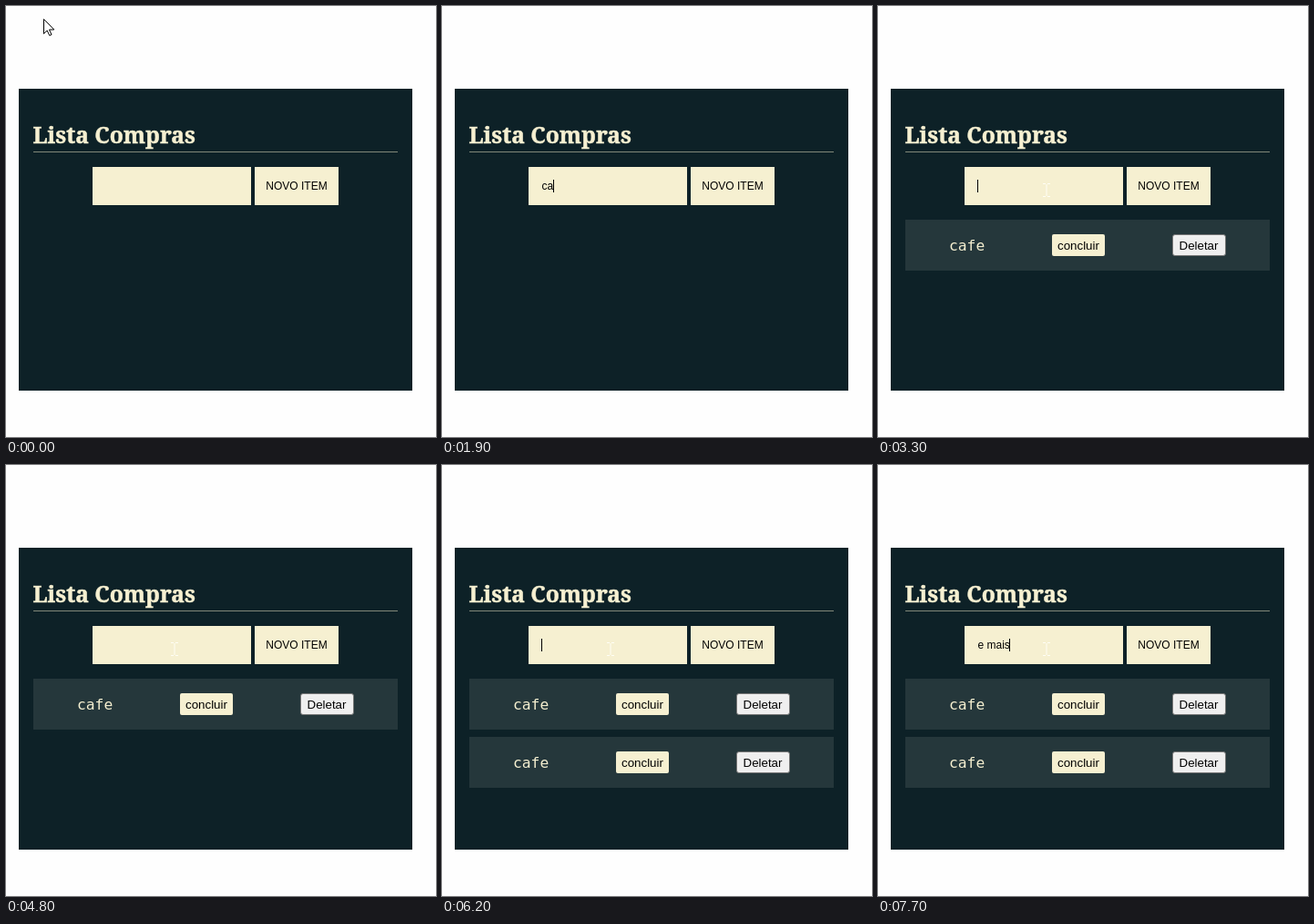
Recreate the animation shown at these times as an HTML page. Size 472x474 px, loop 8000 ms.

```html
<!DOCTYPE html>
<html lang="pt">
<head>
<meta charset="utf-8">
<style>
  html, body { margin: 0; width: 100%; height: 100%; overflow: hidden; background: #fefefe; }
  svg { display: block; font: 12px "Liberation Sans", Arial, sans-serif; }
  .cream { fill: #f6f0d1; }
  .title { font: bold 24.6px "Noto Serif", serif; stroke: #f6f0d1; stroke-width: .5px; }
  .name { font: 16.3px "DejaVu Sans Mono", monospace; }
  .label { font-size: 13.333px; }
</style>
</head>
<body>
<svg width="472" height="474" viewBox="0 0 472 474">
  <defs>
    <g id="item">
      <rect x="30" y="235" width="400" height="56" fill="#25373b"/>
      <text class="cream name" x="78" y="269">cafe</text>
      <rect class="cream" x="191" y="251" width="58" height="24" rx="2"/>
      <text class="label" x="197" y="268">concluir</text>
      <rect x="323.5" y="251.5" width="58" height="23" rx="2.5" fill="#efefef" stroke="#767676"/>
      <text class="label" x="330.5" y="268">Deletar</text>
    </g>
  </defs>
  <rect x="14" y="91" width="432" height="332" fill="#0d2127"/>
  <text class="cream title" x="29.5" y="151">Lista Compras</text>
  <rect x="30" y="160" width="400" height="1" fill="#818879"/>
  <rect class="cream" x="95" y="177" width="174" height="42"/>
  <rect class="cream" x="273" y="177" width="92" height="42"/>
  <text x="285.3" y="202">NOVO ITEM</text>
  <text id="typed" x="109.5" y="202"></text>
  <rect id="caret" y="191" width="1" height="14"/>
  <use id="first" href="#item"/>
  <use id="second" href="#item" y="64"/>
  <path id="beam" d="M0 .5H3M5 .5H8M4 1V14M0 14.5H3M5 14.5H8" fill="none" stroke="#fffef4"/>
  <path id="arrow" d="M.5 .5V16.5L4.2 13L6.8 18.5L9 17.5L6.5 12H11.8Z" fill="#fff" stroke="#000"/>
</svg>
<script>
const LOOP = 8000;
const el = id => document.getElementById(id);
const show = (id, on) => el(id).style.display = on ? "" : "none";
const place = (id, pos) => {
  show(id, pos);
  if (pos) el(id).setAttribute("transform", `translate(${pos})`);
};

// [start, typed text, caret x or 0 when hidden]
const typing = [
  [0, "", 0], [900, "", 109], [1400, "", 0],
  [1800, "c", 115], [1900, "ca", 122], [2000, "caf", 125], [2500, "caf", 0], [2700, "cafe", 132],
  [3300, "", 109], [3800, "", 0], [4300, "", 109], [4800, "", 0],
  [5200, "c", 115], [5300, "ca", 122], [5500, "caf", 125], [5700, "cafe", 132],
  [6200, "", 109], [6700, "", 0], [6800, "e", 116], [7100, "e ", 119],
  [7300, "e m", 129], [7500, "e mai", 138], [7700, "e mais", 144]
];
// [start, arrow position, text cursor position]
const pointer = [
  [0, [41, 14]], [100, [119, 105]], [200, [174, 176]],
  [500, null, [178, 188]], [600, null, [181, 195]], [700],
  [3300, null, [181, 195]]
];
const at = (steps, t) => steps.findLast(step => step[0] <= t);

function draw(now) {
  const t = now % LOOP;
  const [, text, caret] = at(typing, t);
  const [, arrow, beam] = at(pointer, t);
  el("typed").textContent = text;
  show("caret", caret);
  el("caret").setAttribute("x", caret);
  place("arrow", arrow);
  place("beam", beam);
  show("first", t >= 3300);
  show("second", t >= 6200);
}

const start = performance.now();
function tick() {
  draw(performance.now() - start);
  requestAnimationFrame(tick);
}
tick();
</script>
</body>
</html>
```
